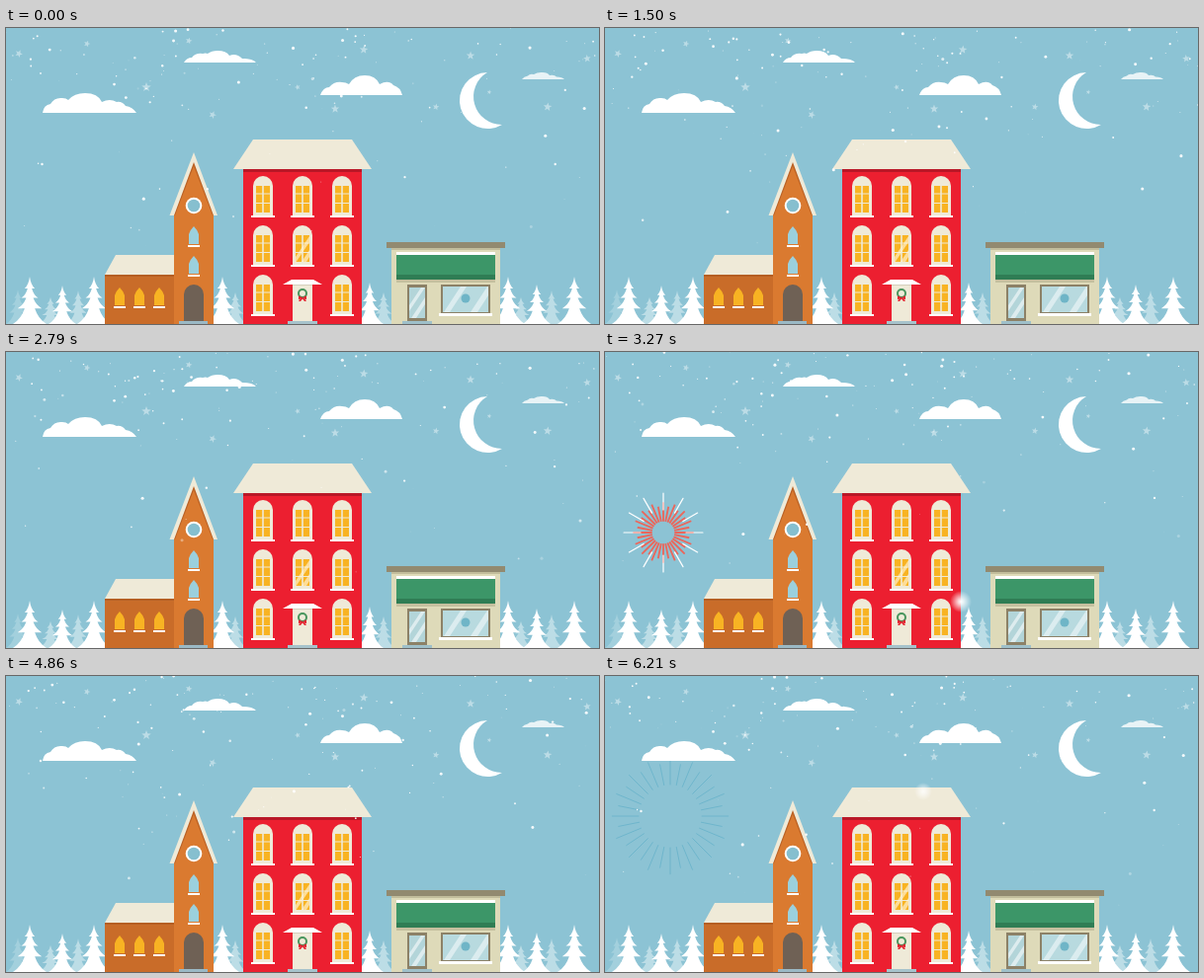
An HTML page with a canvas that plays this animation: 600 px wide and 300 px high, repeating every 6240 ms.

```html
<!DOCTYPE html>
<html lang="en">
<head>
<meta charset="utf-8">
<title>Winter street</title>
<style>
html, body { margin: 0; width: 100%; height: 100%; overflow: hidden; background: #8cc3d4; }
canvas { display: block; width: 600px; height: 300px; }
</style>
</head>
<body>
<canvas id="stage" width="600" height="300"></canvas>
<script>
const ctx = document.getElementById('stage').getContext('2d');
const LOOP = 6240, STEP = 30, BURST = 600, RISE = 300;
const TAU = Math.PI * 2;
const SKY = '#8cc3d4', CREAM = '#efead8', AMBER = '#f8b323', WHITE = '#fff';
const RED = '#ea675c', TEAL = '#4ba5c1', GOLD = '#edbb4e';

const clamp = (v, lo = 0, hi = 1) => Math.max(lo, Math.min(hi, v));
const mod = (v, n) => ((v % n) + n) % n;

function randomizer(seed) {
  return () => {
    seed = (seed * 1664525 + 1013904223) >>> 0;
    return seed / 4294967296;
  };
}

function rect(color, x, y, w, h) {
  ctx.fillStyle = color;
  ctx.fillRect(x, y, w, h);
}

function shape(color, d) {
  ctx.fillStyle = color;
  ctx.fill(new Path2D(d));
}

function disc(color, x, y, r) {
  ctx.fillStyle = color;
  ctx.beginPath();
  ctx.arc(x, y, r, 0, TAU);
  ctx.fill();
}

function line(x1, y1, x2, y2) {
  ctx.beginPath();
  ctx.moveTo(x1, y1);
  ctx.lineTo(x2, y2);
  ctx.stroke();
}

function spokes(x, y, count, inner, outer) {
  ctx.beginPath();
  for (let i = 0; i < count; i++) {
    const a = i / count * TAU, c = Math.cos(a), s = Math.sin(a);
    const end = count > 12 && i % 2 ? inner + (outer - inner) * 0.8 : outer;
    ctx.moveTo(x + c * inner, y + s * inner);
    ctx.lineTo(x + c * end, y + s * end);
  }
  ctx.stroke();
}

// Sky

const stars = [
  [13, 26, 4], [82, 16, 3.5], [185, 13, 3.5], [142, 60, 5], [209, 88, 4],
  [295, 60, 3], [362, 22, 4.5], [333, 82, 4.5], [435, 80, 3.5],
  [470, 28, 4.5], [489, 65, 2.5], [548, 80, 4.5], [588, 31, 4]
];

function star(x, y, r) {
  ctx.beginPath();
  for (let i = 0; i < 10; i++) {
    const a = i * TAU / 10 - Math.PI / 2 + x, d = i % 2 ? r * 0.42 : r;
    ctx.lineTo(x + Math.cos(a) * d, y + Math.sin(a) * d);
  }
  ctx.fill();
}

function drawStars() {
  ctx.fillStyle = 'rgba(255,255,255,.42)';
  stars.forEach(s => star(...s));
}

function drawClouds() {
  shape(WHITE, 'M37 86Q38 78 45 77Q49 70 57 71Q61 71 63 73Q69 66 80 66Q93 66 97 75Q105 71 112 75Q117 74 121 79Q128 80 132 86Z');
  shape(WHITE, 'M180 35Q183 30 188 30Q192 25 199 26Q202 25 204 26Q208 23 214 23Q223 23 226 28Q233 25 239 31Q250 31 253 35Z');
  shape(WHITE, 'M318 68Q321 60 327 60Q332 54 340 55Q344 55 347 57Q352 48 363 48Q374 48 378 57Q387 52 392 58Q399 60 401 68Z');
  shape('rgba(255,255,255,.8)', 'M522 52Q524 49 528 48.500Q530 46 534 47Q538 44.500 543 45Q548 45 550 48Q555 47 557 49.500Q563 49.500 565 52Z');
  shape(WHITE, 'M487 45A28.500 28.500 0 1 0 502 98A28.500 28.500 0 0 1 487 45Z');
}

// Fireworks: [start, x, y, size, colour]

const fireworks = [
  [480, 163, 157, 69, RED],
  [2070, 449, 167, 80, TEAL],
  [3030, 59, 183, 64, RED],
  [3900, 438, 159, 68, TEAL],
  [4152, 80, 212, 72, GOLD],
  [5160, 510, 162, 89, GOLD],
  [5430, 442, 184, 81, RED],
  [5640, 66, 142, 76, TEAL]
];

function burst(x, y, size, color, p) {
  const reach = size * (1 - (1 - p) ** 2);
  const outer = reach * (0.62 + 0.16 * clamp(p * 2));
  const core = clamp((0.38 - p) / 0.1);
  const inner = p < 0.3 ? 0 : outer * (0.25 + 0.3 * p);

  ctx.lineCap = 'butt';
  ctx.globalAlpha = core * 0.85;
  disc(color, x, y, outer);
  ctx.globalAlpha = 1 - clamp((p - 0.6) / 0.4) * 0.45;
  ctx.strokeStyle = color;
  ctx.lineWidth = Math.min(0.6 + 3 * (1 - p), outer * 0.06);
  spokes(x, y, 32, inner, outer);

  ctx.globalAlpha = clamp((0.92 - p) / 0.5);
  ctx.strokeStyle = WHITE;
  ctx.lineCap = 'round';
  ctx.lineWidth = clamp(3 - Math.max(0, p - 0.1) * 6, 0.8, 2.7);
  spokes(x, y, 12, outer * (p < 0.1 ? 0.95 : 0.75), reach - 1);
  ctx.globalAlpha = 1;
}

function rocket(x, y, u) {
  const head = 300 + (y - 300) * u ** 1.5;
  ctx.lineCap = 'butt';
  ctx.lineWidth = 1;
  ctx.strokeStyle = 'rgba(255,255,255,.45)';
  line(x + 0.5, head, x + 0.5, head + 15);
}

function drawFireworks(t) {
  for (const [start, x, y, size, color] of fireworks) {
    const age = mod(t - start + RISE, LOOP) - RISE;
    if (age < 0) rocket(x, y, 1 + age / RISE);
    else if (age < BURST) burst(x, y, size, color, age / BURST);
  }
}

// Trees

function tree(x, top, half, color) {
  const h = 300 - top, y = k => top + h * k;
  const tiers = [[0.25, 0.3], [0.45, 0.5], [0.67, 0.72], [1, 1]];
  ctx.fillStyle = color;
  ctx.beginPath();
  for (const side of [-1, 1]) {
    let neck = 0, prev = 0;
    ctx.moveTo(x, top);
    for (const [k, w] of tiers) {
      const edge = half * w;
      ctx.quadraticCurveTo(x + side * (neck + edge * 0.2), y((prev + k * 2) / 3), x + side * edge, y(k));
      neck = edge * 0.42;
      ctx.lineTo(x + side * neck, y(k));
      prev = k;
    }
    ctx.lineTo(x, 300);
    ctx.closePath();
  }
  ctx.fill();
}

function drawTrees() {
  [[12, 265], [45, 273], [73, 266], [232, 268], [382, 268], [521, 273], [552, 266]]
    .forEach(([x, y], i) => tree(x, y, 12, i ? '#bcdde6' : '#a3d0dd'));
  [[24, 252], [57, 261], [89, 252], [219, 252], [368, 258], [508, 252], [537, 260], [575, 252]]
    .forEach(([x, y]) => tree(x, y, y > 255 ? 14 : 17, WHITE));
}

// Buildings

function lancet(x, y, color) {
  shape(color, `M${x - 5} ${y + 18}V${y + 8}Q${x - 4} ${y + 4} ${x} ${y}Q${x + 4} ${y + 4} ${x + 5} ${y + 8}V${y + 18}Z`);
  rect(WHITE, x - 6, y + 19, 12, 2);
}

function drawChurch() {
  rect('#c96c29', 100, 250, 70, 50);
  rect('#b55e22', 100, 250, 70, 2);
  shape(CREAM, 'M111 230H170V250H100Z');
  [115, 135, 155].forEach(x => lancet(x, 263, AMBER));

  shape('#da7a30', 'M190 134L210 187V300H170V187Z');
  shape('#bb6225', 'M190 134L211 190H209L190 140L171 190H169Z');
  shape(CREAM, 'M190 126L214 190H210L190 136L170 190H165.500Z');
  disc(WHITE, 190, 180, 8.300);
  disc('#86bfcf', 190, 180, 6.300);
  lancet(190, 201, '#9bd0dd');
  lancet(190, 231, '#9bd0dd');
  shape('#6f6155', 'M180 300V270A10 10 0 0 1 200 270V300Z');
  rect('#9bb9c5', 175, 297, 29, 3);
}

function archWindow(x, y) {
  shape(CREAM, `M${x} ${y + 40}V${y + 10}a10 10 0 0 1 20 0V${y + 40}Z`);
  rect(AMBER, x + 3, y + 10, 14, 27);
  rect(CREAM, x + 9.2, y + 10, 1.6, 27);
  rect(CREAM, x + 3, y + 17.5, 14, 1);
  rect(CREAM, x + 3, y + 27, 14, 1);
  rect(WHITE, x - 2, y + 40, 24, 2);
}

function drawHouse() {
  rect('#ec1f30', 240, 143, 120, 157);
  rect('#b91827', 240, 143, 120, 3);
  shape(CREAM, 'M250 113H350L370 143H230Z');
  for (const y of [150, 200, 250]) {
    for (const x of [250, 290, 330]) {
      if (x !== 290 || y !== 250) archWindow(x, y);
    }
  }
  shape('rgba(255,244,215,.65)', 'M293 232L307 211V217L293 238ZM299 237L307 225V232L304 237Z');

  rect(CREAM, 290, 260, 20, 38);
  rect('#d5cfbd', 290, 260, 20, 1);
  shape(WHITE, 'M280 260L289 255H311L320 260Z');
  ctx.strokeStyle = '#48955c';
  ctx.lineWidth = 2;
  ctx.beginPath();
  ctx.arc(300, 269, 4, 0, TAU);
  ctx.stroke();
  shape('#e4222f', 'M300 273L296 271.500V275.500ZM300 273L304 271.500V275.500ZM299 273L296 277H298L300 274.500L302 277H304L301 273Z');
  rect('#a7c3cc', 285, 297, 30, 3);
}

function drawShop() {
  rect('#dedab9', 390, 223, 110, 77);
  rect('#c2bd9c', 390, 223, 110, 2);
  rect('#928a70', 385, 217, 120, 6);
  rect(WHITE, 395, 227, 100, 3);
  rect('#3c9668', 395, 230, 100, 20);
  rect('#2f7d54', 395, 250, 100, 5);
  rect('#c5c09f', 395, 255, 100, 3);

  rect('#8c8167', 406, 260, 20, 37);
  rect('#b3d5d9', 408, 263, 16, 31);
  shape('rgba(255,255,255,.55)', 'M408 281L420 263H424L408 287ZM410 294L424 273V280L415 294Z');
  rect('#9fc0ca', 401, 297, 30, 3);

  rect('#8c8167', 440, 260, 50, 29);
  rect('#b8dadf', 442, 262, 46, 26);
  shape('rgba(255,255,255,.5)', 'M443 288L460 262H466L449 288ZM470 288L487 262H488V271L477 288Z');
  disc('#6fb5c7', 465, 274, 4.5);
  rect(WHITE, 438, 289, 54, 3);
}

// Snow

const rand = randomizer(77);
const flakes = Array.from({ length: 135 }, () => ({
  x: rand() * 600,
  fall: 35 + 210 * rand() ** 1.7,
  drift: (rand() - 0.5) * 24,
  phase: rand(),
  turns: rand() < 0.5 ? 1 : 2,
  r: 0.45 + 1.2 * rand() ** 2.4
}));

function drawSnow(t) {
  for (const f of flakes) {
    const u = (t / LOOP * f.turns + f.phase) % 1;
    ctx.globalAlpha = clamp((1 - u) * 5) * 0.9;
    disc(WHITE, f.x + f.drift * u, f.fall * u - 2, f.r);
  }
  ctx.globalAlpha = 1;
}

// Twinkles: [peak time, x, y, radius]

const twinkles = [
  [2220, 148, 30, 6], [2220, 430, 25, 7], [3270, 360, 253, 11],
  [5550, 288, 23, 7], [5550, 435, 115, 5], [6150, 322, 117, 9]
];

function drawTwinkles(t) {
  for (const [peak, x, y, r] of twinkles) {
    const k = 1 - Math.abs(t - peak) / 180;
    if (k <= 0) continue;
    const glow = ctx.createRadialGradient(x, y, 0, x, y, r);
    glow.addColorStop(0, '#fff');
    glow.addColorStop(0.25, 'rgba(255,255,255,.8)');
    glow.addColorStop(1, 'rgba(255,255,255,0)');
    ctx.globalAlpha = Math.sqrt(k);
    disc(glow, x, y, r);
  }
  ctx.globalAlpha = 1;
}

function draw(t) {
  rect(SKY, 0, 0, 600, 300);
  drawStars();
  drawFireworks(t);
  drawClouds();
  drawTrees();
  drawChurch();
  drawHouse();
  drawShop();
  drawSnow(t);
  drawTwinkles(t);
}

const begin = performance.now();

function tick() {
  const t = (performance.now() - begin) % LOOP;
  draw(Math.floor(t / STEP) * STEP);
  requestAnimationFrame(tick);
}

tick();
</script>
</body>
</html>
```
